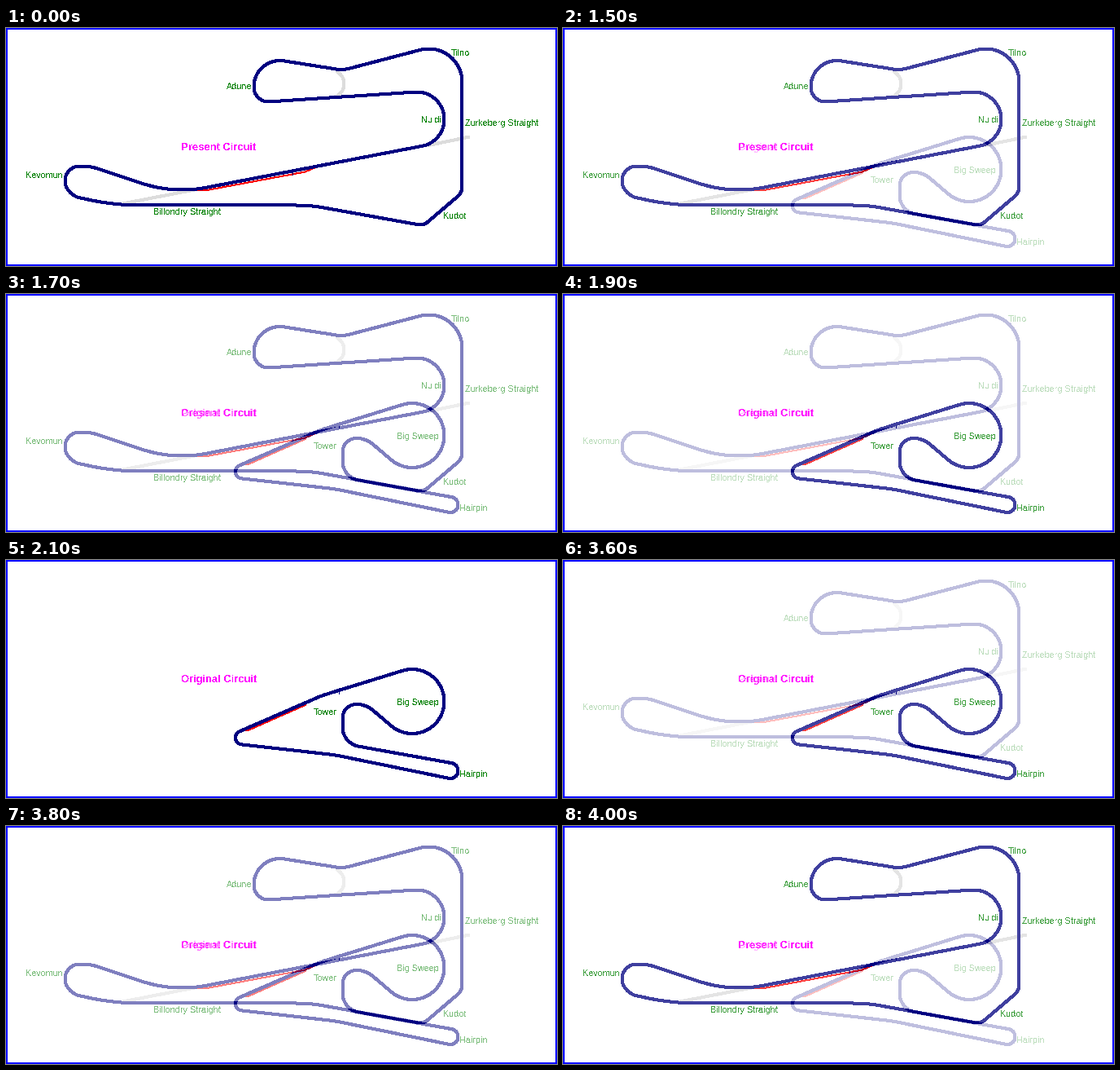
A matplotlib script for the animation above (4.2 s loop, 677x292 px).

```python
import matplotlib.pyplot as plt
import numpy as np
from matplotlib.animation import FuncAnimation
from matplotlib.patches import Rectangle

W, H, DPI = 677, 292, 100
PX = 72 / DPI  # points per pixel
NAVY, GREY, RED, GREEN, PINK = "#000080", "#dcdcdc", "#ff0000", "#008000", "#ff00ff"
STEP, LOOP = 100, 4200  # ms
FADE_OUT, FADE_IN, HOLD = 1500, 3600, 200

fig = plt.figure(figsize=(W / DPI, H / DPI), dpi=DPI, facecolor="white")


def layer():
    """A full-stage axes in pixel coordinates with a white ground and border."""
    ax = fig.add_axes([0, 0, 1, 1])
    ax.set_xlim(0, W)
    ax.set_ylim(H, 0)
    ax.axis("off")
    ax.add_patch(Rectangle((0, 0), W, H, fc="white", ec="none", zorder=0))
    ax.add_patch(Rectangle((1, 1), W - 2, H - 2, fc="none", ec="#0000ff",
                           lw=2 * PX, zorder=9))
    return ax


def stroke(ax, pts, color, width):
    x, y = np.transpose(pts) + 0.5
    ax.plot(x, y, color=color, lw=width * PX, antialiased=False,
            solid_capstyle="butt", solid_joinstyle="round")


def label(ax, x, y, text, color=GREEN, size=10.7, weight="normal"):
    ax.text(x, y, text, color=color, fontsize=size * PX, fontweight=weight,
            family="Liberation Sans", va="baseline", antialiased=False, zorder=6)


def arc(cx, cy, r, start, stop):
    """Points on a bend, by heading; r > 0 turns right, r < 0 turns left."""
    a = np.linspace(start, stop, 40)
    return np.column_stack([cx + r * np.sin(a), cy - r * np.cos(a)])


def circuit(bends):
    """Closed track: arcs around the bends (x, y, r), joined by tangents."""
    heads = []
    for (x1, y1, r1), (x2, y2, r2) in zip(bends, bends[1:] + bends[:1]):
        dx, dy = x2 - x1, y2 - y1
        lean = np.clip((r2 - r1) / np.hypot(dx, dy), -1, 1)
        heads.append(np.arctan2(dy, dx) - np.arcsin(lean))
    parts = []
    for i, (x, y, r) in enumerate(bends):
        side = np.sign(r)
        turn = (side * (heads[i] - heads[i - 1]) + 0.3) % (2 * np.pi) - 0.3
        parts.append(arc(x, y, r, heads[i - 1], heads[i - 1] + side * turn))
    return np.vstack(parts + [parts[0][:1]])


# Present layout
now = layer()
stroke(now, [(516, 144), (569, 133)], GREY, 3)
stroke(now, [(143, 215), (236, 197)], GREY, 3)
stroke(now, arc(398, 68, 17, np.radians(25), np.radians(170)), GREY, 3)
stroke(now, [(226, 199), (249, 198), (367, 176), (383, 169)], RED, 1)
stroke(now, [(351, 173), (351, 179)], NAVY, 1)
stroke(now, circuit([
    (519, 66, 41), (544, 194, 16), (508.5, 227, 14), (356, 417, -200),
    (165, -83, 300), (95.5, 184.5, 24), (90, 187, 18), (93, 230, 61),
    (216, 38, -160), (504.5, 111.5, -33.5), (322, 72, 18), (336, 71.5, 32),
    (411, 10.5, -40),
]), NAVY, 3)
label(now, 547, 34, "Tilno")
label(now, 271, 75, "Adune")
label(now, 510, 116, "Nuldi")
label(now, 563.5, 120, "Zurkeberg Straight")
label(now, 24, 184, "Kevomun")
label(now, 181, 229, "Billondry Straight")
label(now, 537, 234, "Kudot")
label(now, 215, 150, "Present Circuit", PINK, 13, "bold")

# Early layout
old = layer()
stroke(old, [(290, 209), (298, 208), (368, 177)], RED, 1)
stroke(old, [(408, 156), (408, 163)], NAVY, 1)
stroke(old, circuit([
    (498.5, 173, 39.5), (430, 208.5, -32), (430, 193.5, -17),
    (437, 204.5, -24), (545.5, 258, 9.5), (365.5, 486, -250),
    (290, 217.5, 8.5), (439, 307, 150),
]), NAVY, 3)
label(old, 378, 190, "Tower")
label(old, 480, 178, "Big Sweep")
label(old, 557, 266, "Hairpin")
label(old, 215, 150, "Original Circuit", PINK, 13, "bold")


def quarters(t, start):
    return np.clip((t - start) // HOLD + 1, 0, 4)


def fade(amount):
    """Scale the opacity of a whole layer."""
    def apply(img, dpi):
        out = img.copy()
        out[..., 3] *= amount
        return np.rint(out * 255).astype(np.uint8), 0, 0
    return apply


def update(i):
    t = i * STEP
    amount = (quarters(t, FADE_OUT) - quarters(t, FADE_IN)) / 4
    old.set_visible(amount > 0)
    old.set_agg_filter(fade(amount))
    return []


anim = FuncAnimation(fig, update, frames=LOOP // STEP, interval=STEP,
                     init_func=lambda: update(0), repeat=True,
                     repeat_delay=0, blit=False)
plt.show()
```
